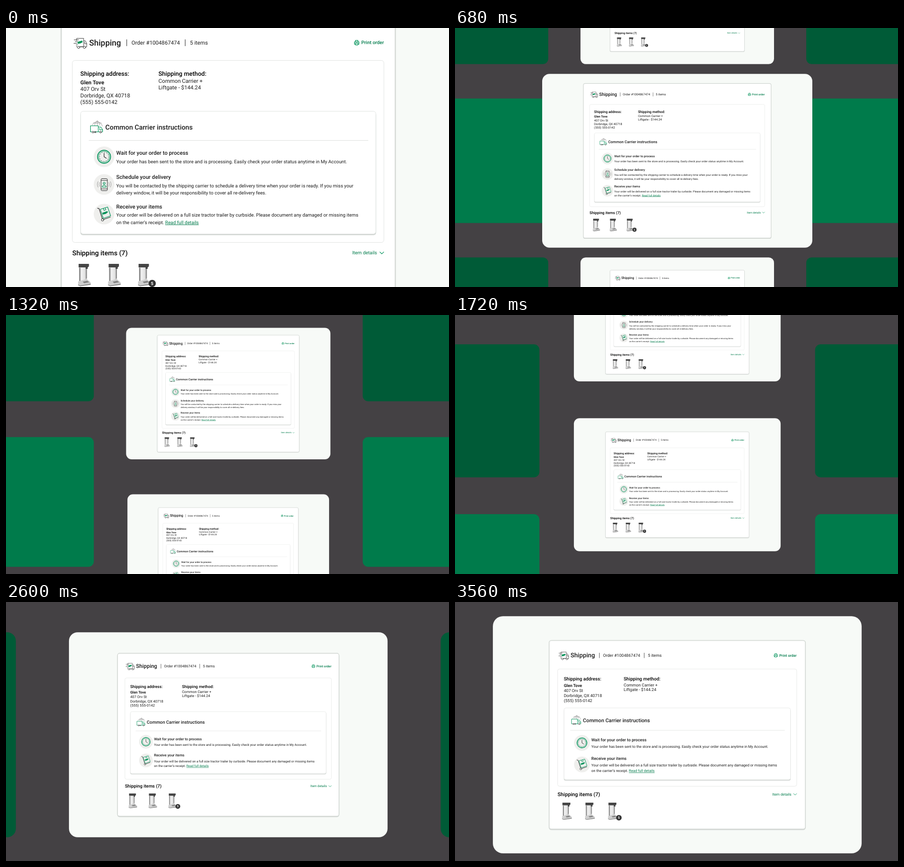
An HTML page that plays this animation: 879 by 515 pixels, repeating every 4040 ms.

```html
<!DOCTYPE html>
<html lang="en">
<head>
<meta charset="utf-8">
<title>Shipping order</title>
<style>
  html, body { margin: 0; width: 100%; height: 100%; overflow: hidden; background: #444144; }
  svg { display: block; width: 879px; height: 515px; }
  text { font-family: Roboto, Arial, sans-serif; fill: #1c1c1c; text-rendering: geometricPrecision; }

  .h1 { font-size: 16.1px; font-weight: 500; }
  .h2 { font-size: 13.4px; font-weight: 500; }
  .h3 { font-size: 12.1px; font-weight: 500; fill: #000; }
  .h4 { font-size: 10.75px; font-weight: 500; }
  .txt { font-size: 10.75px; }
  .sm { font-size: 9.38px; }
  .link { font-size: 9.45px; fill: #007b4b; }
  .u { fill: #007b4b; text-decoration: underline; }
  .m { font-weight: 500; }
  .b { font-weight: 700; }

  .bright { fill: #007b4b; }
  .dark { fill: #005b37; }
  .page { fill: #f7faf7; }
  .box { fill: #fff; stroke: #e2e5e3; }
  .shade { fill: #d4d8d5; }
  .disc { fill: #efefed; }
  .ink, .grn, .gry { fill: none; stroke-linecap: round; stroke-linejoin: round; }
  .ink { stroke: #333; }
  .grn { stroke: #00935a; stroke-width: 1.1; }
  .gry { stroke: #999; stroke-width: .9; }

  /* Registered numbers keep the artwork redrawn, and so sharp, at every scale. */
  @property --zoom { syntax: "<number>"; inherits: true; initial-value: .3845; }
  @property --hero { syntax: "<number>"; inherits: true; initial-value: 2.6; }
  @property --row { syntax: "<number>"; inherits: true; initial-value: 0; }

  /* 1000 ms = 24.7525% of the loop */
  .world { animation: zoom 4040ms infinite, hero 4040ms infinite, row 4040ms infinite; transform: scale(var(--zoom)); }
  .main { transform: translateY(calc(var(--row) * -785px)); }
  .side { transform: translateY(calc(var(--row) * 785px)); }
  .hero { transform: scale(var(--hero)); }
  @keyframes zoom {
    0% { --zoom: .3845; animation-timing-function: linear; }
    49.505% { --zoom: .4374; animation-timing-function: ease; }
    86.634%, 100% { --zoom: .767; }
  }
  @keyframes hero {
    0% { --hero: 2.6; animation-timing-function: ease; }
    37.129%, 100% { --hero: 1; }
  }
  @keyframes row {
    0%, 24.7525% { --row: 0; animation-timing-function: ease; }
    61.881%, 100% { --row: 1; }
  }
</style>
</head>
<body>
<svg viewBox="0 0 879 515">
  <defs>
    <linearGradient id="steel">
      <stop offset="0" stop-color="#b5b5b5"/>
      <stop offset=".3" stop-color="#f1f1f1"/>
      <stop offset=".75" stop-color="#e2e2e2"/>
      <stop offset="1" stop-color="#a4a4a4"/>
    </linearGradient>

    <rect id="tile" x="-477" y="-307.5" width="954" height="615" rx="26"/>

    <g id="sides">
      <use href="#tile" x="-1113"/>
      <use href="#tile" x="1113"/>
    </g>

    <g id="brewer">
      <path fill="url(#steel)" d="M145 474h15v27l-14 4z"/>
      <path fill="#8a8a8a" d="M145 477h2.500v26h-2.500zM158.500 479h2v19h-2z"/>
      <path fill="#454545" d="M144 469h20.500v5l-2.500 2v3h-4v-3h-14z"/>
      <path fill="#cfcfcf" d="M143 504l17-5 8 7v4l-21 3.500-4-3z"/>
      <path fill="#858585" d="M152 504.500l9-2 4 3-10 2zM143 510l4 2 21-3.500v2l-21 3-4-2z"/>
    </g>

    <g id="head">
      <g class="ink" stroke-width=".9">
        <path d="M140 25v-4.500h14v16.500h-8M154 25.500h3.500l2.500 5v7h-2.500M153 37.500h-6M140 36v1.500h1M156 28v3h4"/>
        <path d="M135 23.500h9M137 27h5M134.500 30.500h6M139 33.500h3"/>
        <circle cx="144" cy="38.500" r="2.200"/><circle cx="155.500" cy="38.500" r="2.200"/>
      </g>
      <path fill="#00935a" d="M142 27.500l9-2.500 1 3-4 2.500-6 1z"/>
      <text class="h1" x="165" y="34.700">Shipping</text>
      <path class="ink" d="M239.500 23v12.500M355.500 23v12.500"/>
      <text class="txt" x="249" y="32.700">Order #1004867474</text>
      <text class="txt" x="365" y="32.700">5 items</text>
      <path class="grn" stroke-width=".9" d="M693.500 27v-2.500h5v2.500M693 32h-1.500v-4.500h9v4.500h-1.500M693.500 30h5v3.500h-5z"/>
      <text class="link m" x="705" y="32.400">Print order</text>
    </g>

    <g id="address">
      <text class="h3" x="147.500" y="94.600">Shipping address:</text>
      <text class="txt b" x="147.500" y="111.600">Glen Tove</text>
      <text class="txt" x="147.500" y="124.800">407 Orv St</text>
      <text class="txt" x="147.500" y="137.800">Dorbridge, QX 40718</text>
      <text class="txt" x="147.500" y="150.800">(555) 555-0142</text>
      <text class="h3" x="302.500" y="94.600">Shipping method:</text>
      <text class="txt" x="302.500" y="109.200">Common Carrier +</text>
      <text class="txt" x="302.500" y="122.200">Liftgate - $144.24</text>
    </g>

    <g id="steps">
      <path class="gry" d="M171 193a10.500 10.500 0 0 1 20 2M181 184.500v9.500M176 193.500q0-6 5-9q5 3 5 9M173 189h16"/>
      <path class="grn" d="M170 206.500h-2.500v-12h15.500v12h-7.500M183 197h5l3.500 5v4.500h-1.500M185 206.500h-2M186 199.500v3h5"/>
      <g class="ink">
        <circle cx="172.500" cy="207" r="1.700"/><circle cx="177" cy="207" r="1.300"/><circle cx="187.500" cy="207" r="1.700"/>
      </g>
      <text class="h2" x="197" y="202.300">Common Carrier instructions</text>
      <path stroke="#dfe1df" d="M164 223.500h555"/>

      <circle class="disc" cx="194.500" cy="256" r="20.500"/>
      <circle cx="194.500" cy="256" r="12.900" fill="none" stroke="#00935a" stroke-width="1.700"/>
      <circle cx="194.500" cy="256" r="10.600" fill="none" stroke="#00935a" stroke-width=".8"/>
      <circle cx="194.500" cy="256" r="8.800" fill="none" stroke="#333" stroke-width="1.300" stroke-dasharray=".7 3.908"/>
      <path class="ink" stroke-width="1.200" d="M194.500 249v7l4.500 3"/>
      <text class="h4" x="218.700" y="252">Wait for your order to process</text>
      <text class="sm" x="218.700" y="268.600">Your order has been sent to the store and is processing. Easily check your order status anytime in My Account.</text>
    </g>

    <g id="schedule">
      <circle class="disc" cx="194.500" cy="311" r="20.500"/>
      <rect class="ink" x="188.500" y="299.500" width="12.500" height="24" rx="2"/>
      <path class="ink" d="M188.500 303h12.500M188.500 320h12.500"/>
      <circle class="grn" cx="194.700" cy="308.700" r="2"/>
      <path class="grn" d="M191 316.500v-1q0-2.500 3.700-2.500t3.700 2.500v1z"/>
      <path class="gry" d="M185.500 307q-2 4 0 8M182.500 305.500q-3 5.500 0 11M204 307q2 4 0 8M207 305.500q3 5.500 0 11"/>
      <text class="h4" x="218.700" y="300.300">Schedule your delivery</text>
      <text class="sm" x="218.700" y="316.800">You will be contacted by the shipping carrier to schedule a delivery time when your order is ready. If you miss your</text>
      <text class="sm" x="218.700" y="331.400">delivery window, it will be your responsibility to cover all re-delivery fees.</text>
    </g>

    <g id="receive">
      <circle class="disc" cx="194.500" cy="370" r="20.500"/>
      <path class="ink" stroke-width="1.200" d="M181.500 358.500l3 .5 6.500 20.500M194 380.500l13-4.500"/>
      <circle class="ink" cx="191.500" cy="381.500" r="2.400"/>
      <path class="grn" d="M187 360.500l14.500-4.500 6 17.500-14.500 5zM193 358.800l1.500 4 3.500-1.200-1.300-4"/>
      <path fill="#00935a" d="M191 367.500l10-3.500 1 2.500-4 3-6 1.500z"/>
      <text class="h4" x="218.700" y="358.600">Receive your items</text>
      <text class="sm" x="218.700" y="375.300">Your order will be delivered on a full size tractor trailer by curbside. Please document any damaged or missing items</text>
      <text class="sm" x="218.700" y="389.800">on the carrier’s receipt. <tspan class="u">Read full details</tspan></text>
    </g>

    <g id="foot">
      <text class="h2" x="131.500" y="451.800" style="fill:#000">Shipping items (7)</text>
      <text class="link" x="687" y="450.400">Item details</text>
      <path class="grn" d="M742 445.500l3.800 3.800 3.800-3.800"/>
      <use href="#brewer"/>
      <use href="#brewer" x="59.500"/>
      <use href="#brewer" x="119"/>
      <circle cx="290" cy="508" r="7.200" fill="#333"/>
      <text x="290" y="511" text-anchor="middle" font-size="8.500" class="b" style="fill:#fff">5</text>
    </g>

    <g id="long">
      <use href="#tile" class="page"/>
      <g transform="translate(-441 -264)">
        <rect class="shade" x="108.500" y="-8" width="665" height="548" rx="7"/>
        <rect x="109.500" y="-9.500" width="663" height="547" rx="6" fill="#fff" stroke="#d3d8d4" stroke-width="2"/>
        <rect class="box" x="131.500" y="64.500" width="618.500" height="362" rx="5"/>
        <rect class="shade" x="147.500" y="168" width="587" height="244" rx="5"/>
        <rect class="box" x="148" y="165.500" width="586" height="244" rx="5"/>
        <use href="#head"/>
        <use href="#address"/>
        <use href="#steps"/>
        <use href="#schedule"/>
        <use href="#receive"/>
        <use href="#foot"/>
      </g>
    </g>

    <g id="short">
      <use href="#tile" class="page"/>
      <g transform="translate(-441 -235)">
        <rect class="shade" x="108.500" y="-8" width="665" height="490" rx="7"/>
        <rect x="109.500" y="-9.500" width="663" height="489" rx="6" fill="#fff" stroke="#d3d8d4" stroke-width="2"/>
        <rect class="box" x="131.500" y="64.500" width="618.500" height="304" rx="5"/>
        <rect class="shade" x="147.500" y="168" width="587" height="186" rx="5"/>
        <rect class="box" x="148" y="165.500" width="586" height="186" rx="5"/>
        <use href="#head"/>
        <use href="#address"/>
        <use href="#steps"/>
        <use href="#receive" y="-58"/>
        <use href="#foot" y="-58"/>
      </g>
    </g>
  </defs>

  <rect width="879" height="515" fill="#444144"/>
  <g transform="translate(441 264)">
    <g class="world">
      <g class="side">
        <use href="#sides" class="bright" y="-1570"/>
        <use href="#sides" class="dark" y="-785"/>
        <use href="#sides" class="bright"/>
        <use href="#sides" class="dark" y="785"/>
      </g>
      <g class="main">
        <use href="#short" y="-785"/>
        <use href="#short" y="785"/>
        <use href="#long" y="1570"/>
        <g class="hero"><use href="#long"/></g>
      </g>
    </g>
  </g>
</svg>
</body>
</html>
```
